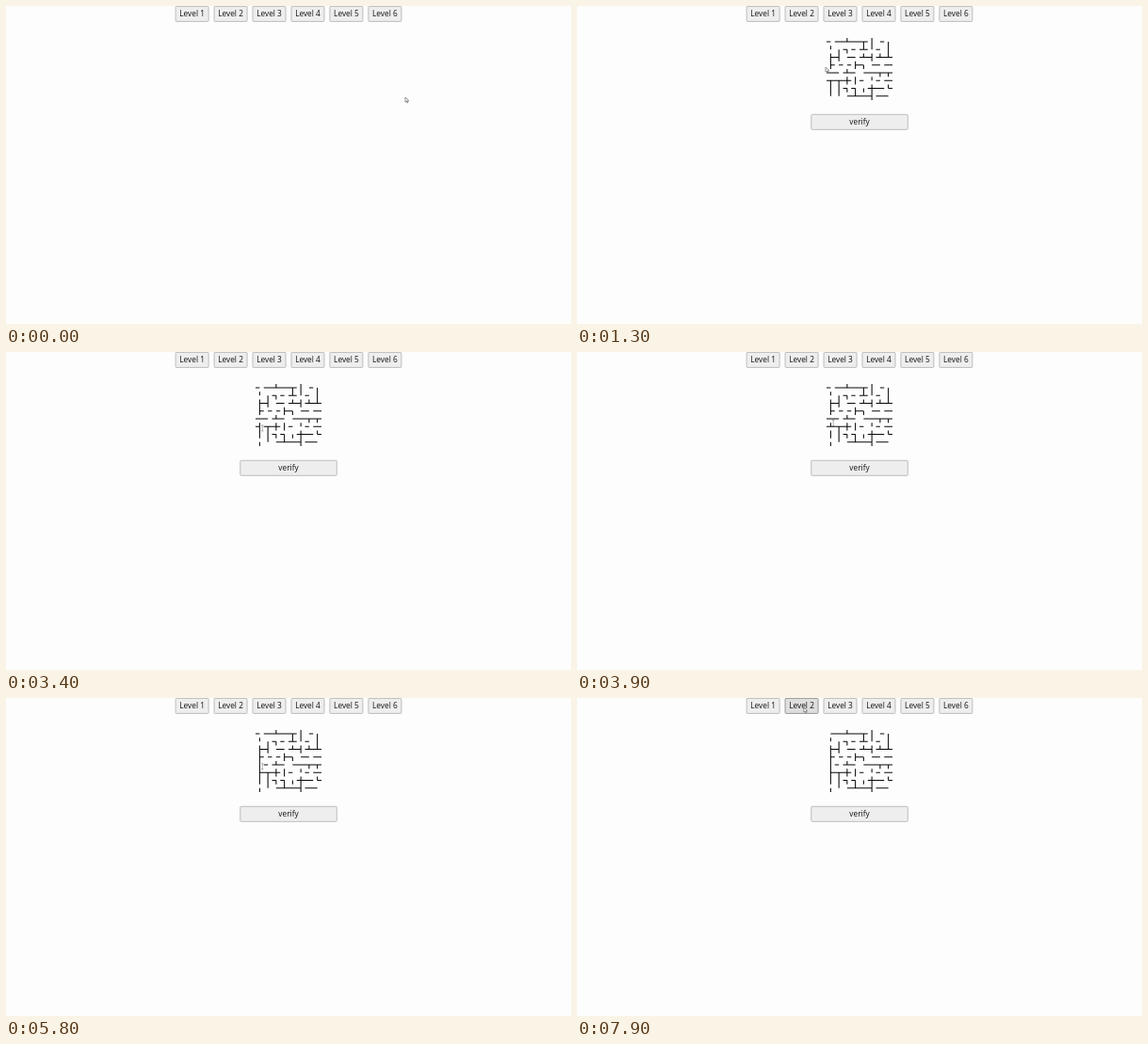
Write an HTML page that moves like this. It is 600 px wide and 338 px high and loops after 8000 ms.

```html
<!DOCTYPE html>
<html lang="en">
<head>
<meta charset="utf-8">
<title>Pipe puzzle</title>
<style>
  html, body { margin: 0; width: 100%; height: 100%; overflow: hidden; background: #fdfdfe; }
  svg { display: block; width: 100vw; height: 100vh; }
  text { font: 8.3px "Open Sans", "Noto Sans", sans-serif; text-anchor: middle; fill: #111; }
  .button rect { fill: #eee; stroke: #bcbcbc; }
  .button.hover rect { fill: #dedede; stroke: #999; }
  #pipes { fill: none; stroke: #080808; stroke-width: 1.05; }
  #arrow { fill: #fff; stroke: #666; stroke-width: .7; }
  #beam { fill: none; stroke: #777; stroke-width: .6; }
</style>
</head>
<body>
<svg viewBox="0 0 600 338">
  <g id="buttons"></g>
  <path id="pipes"/>
  <path id="arrow" d="M0 0V5.2L1.3 4.1L2.2 6L3 5.6L2.2 3.8H3.9Z"/>
  <path id="beam" d="M-1.2 -3H1.2M0 -3V3M-1.2 3H1.2"/>
</svg>
<script>
const LOOP = 8000, STEP = 100, PUZZLE_AT = 900;
const byId = id => document.getElementById(id);
const pipes = byId("pipes"), arrow = byId("arrow"), beam = byId("beam");

// A piece's index holds its arms as bits: 1 up, 2 right, 4 down, 8 left.
const PIECES = " ╵╶└╷│┌├╴┘─┴┐┤┬┼";
const puzzle = ["╴─┴─┬│╶╷",
                "╵╷┐╴┴╵╴│",
                "├┤╶╴┴┤┴┴",
                "├╶╶├┐╶╴─",
                "─╴┴╴╶─┬┬",
                "┬┬┼│╴╵╴─",
                "││┐┐╷┼─└",
                "╵╵╶┴─┤─╴"];
const SIZE = puzzle.length, CELL_W = 8.75, CELL_H = 8.25;
const board = { x: 265, y: 33.9, w: SIZE * CELL_W, h: SIZE * CELL_H };

const centerX = col => board.x + (col + .5) * CELL_W;
const centerY = row => board.y + (row + .5) * CELL_H;

// Pointer moves; a move to a row ends on its first tile, which each click turns.
const move = (leave, arrive, x, y) => ({ leave, arrive, x, y, clicks: [] });
const visit = (leave, arrive, row, ...clicks) =>
  ({ leave, arrive, x: centerX(0) + 2.8, y: centerY(row) + 1.7, row, clicks });
const moves = [
  move(0, 0, 424, 97),
  move(100, 700, 198, 10),
  move(1000, 1300, 264, 65),
  move(1300, 1600, 276, 120),
  visit(1600, 2000, 7, 2200, 2600),
  visit(2600, 3100, 5, 3400, 3700),
  visit(3700, 4000, 4),
  visit(4700, 5200, 5, 5400),
  visit(5500, 5800, 4, 5800),
  visit(6100, 6700, 0, 6900, 7100),
  move(7100, 7700, 261, 18),
  move(7700, 7800, 241, 10)
];

function makeButton(center, y, w, label) {
  const x = center - w / 2, h = 16;
  byId("buttons").insertAdjacentHTML("beforeend",
    `<g class="button"><rect x="${x}" y="${y}" width="${w}" height="${h}" rx=".8"/>
     <text x="${center}" y="${y + 11}">${label}</text></g>`);
  return { x, y, w, h, node: byId("buttons").lastElementChild };
}

const buttons = [];
for (let n = 1; n <= 6; n++) buttons.push(makeButton(300 + (n - 3.5) * 40.95, .4, 35, "Level " + n));
const verify = makeButton(300, 115.3, 102.5, "verify");
buttons.push(verify);

const inside = (p, { x, y, w, h }) => p.x >= x && p.x <= x + w && p.y >= y && p.y <= y + h;

function pointerAt(t) {
  const i = moves.findLastIndex(m => m.leave <= t);
  const to = moves[i], from = moves[i - 1] ?? to;
  const k = Math.min(1, (t - to.leave) / (to.arrive - to.leave || 1));
  return { x: from.x + (to.x - from.x) * k, y: from.y + (to.y - from.y) * k };
}

function turnsOf(row, t) {
  return moves.filter(m => m.row === row).flatMap(m => m.clicks).filter(time => time <= t).length;
}

function pipePath(t) {
  let d = "";
  puzzle.forEach((line, row) => [...line].forEach((piece, col) => {
    const x = centerX(col), y = centerY(row), turns = col ? 0 : turnsOf(row, t);
    const ends = ["V" + (y - CELL_H / 2), "H" + (x + CELL_W / 2), "V" + (y + CELL_H / 2), "H" + (x - CELL_W / 2)];
    for (let arm = 0; arm < 4; arm++)
      if (PIECES.indexOf(piece) >> arm & 1) d += `M${x} ${y}${ends[(arm + turns) % 4]}`;
  }));
  return d;
}

function show(node, visible) {
  node.style.display = visible ? "" : "none";
}

function draw(now) {
  const t = Math.floor(now % LOOP / STEP) * STEP;
  const pointer = pointerAt(t), started = t >= PUZZLE_AT;
  const overBoard = started && inside(pointer, board);

  show(pipes, started);
  show(verify.node, started);
  pipes.setAttribute("d", pipePath(t));
  for (const b of buttons) b.node.classList.toggle("hover", inside(pointer, b));

  show(arrow, !overBoard);
  show(beam, overBoard);
  for (const node of [arrow, beam]) node.setAttribute("transform", `translate(${pointer.x} ${pointer.y})`);
}

const start = performance.now();
function tick() {
  draw(performance.now() - start);
  requestAnimationFrame(tick);
}
tick();
</script>
</body>
</html>
```
